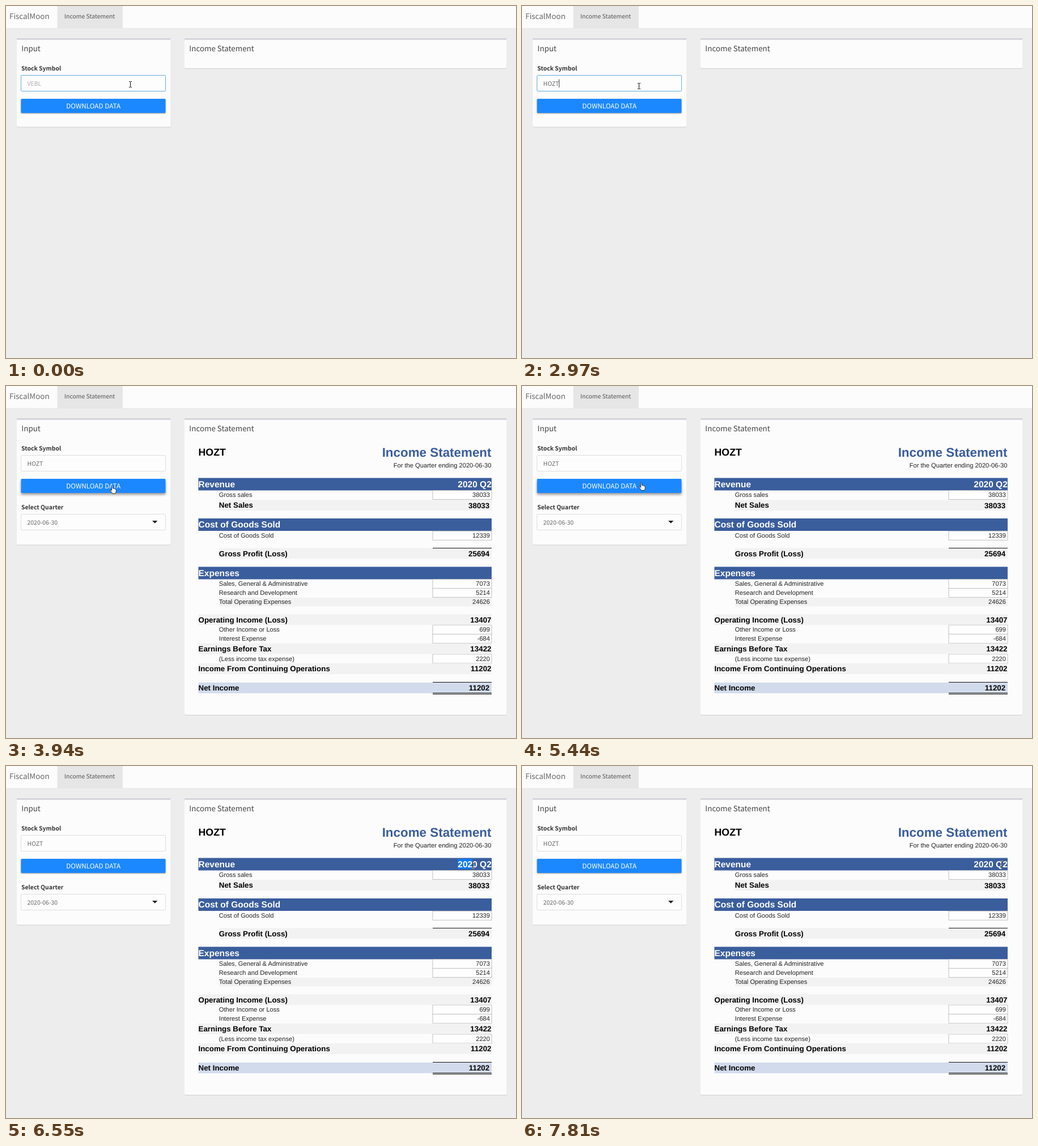
An HTML page for the animation above (8000 ms loop, 900 by 622 pixels).

```html
<!DOCTYPE html>
<html lang="en">
<head>
<meta charset="utf-8">
<title>Income statement</title>
<style>
html, body { margin: 0; width: 100%; height: 100%; overflow: hidden; background: #ededed; }
svg { display: block; }
text { white-space: pre; text-rendering: geometricPrecision; }
.ui { font-family: "Noto Sans CJK JP", "Noto Sans CJK SC", "Noto Sans CJK", "Open Sans", sans-serif; font-size: 10.45px; }
.big { font-size: 13.4px; }
.sheet { font-family: "Liberation Sans", Arial, sans-serif; font-size: 11.15px; fill: #222; }
.total { font-size: 13.36px; font-weight: bold; fill: #000; }
.band { font-size: 15.5px; font-weight: bold; fill: #fff; }
.bold { font-weight: bold; }
.card { filter: drop-shadow(0 1px .5px rgba(0, 0, 0, .12)); }
.beam { mix-blend-mode: difference; }
</style>
</head>
<body>
<svg id="stage" width="900" height="622" viewBox="0 0 900 622"></svg>
<script>
const LOOP = 8000;
const SYMBOL = "HOZT";
const BLUE = "#3a5d9c";
const stage = document.getElementById("stage");

function add(tag, attrs, parent = stage) {
  const node = document.createElementNS("http://www.w3.org/2000/svg", tag);
  for (const key in attrs) node.setAttribute(key, attrs[key]);
  parent.append(node);
  return node;
}
const group = (attrs = {}) => add("g", attrs);
const rect = (x, y, width, height, fill, parent, extra = {}) =>
  add("rect", { x, y, width, height, fill, ...extra }, parent);
function text(str, x, y, cls, parent, extra = {}) {
  const node = add("text", { x, y, class: cls, ...extra }, parent);
  node.textContent = str;
  return node;
}
const END = { "text-anchor": "end" };

// Navigation bar
rect(0, 0, 900, 39, "#fcfcfc");
rect(0, 39, 900, 1, "#e8e8e8");
rect(90.5, 0, 115.5, 39.5, "#e6e6e6");
text("FiscalMoon", 6, 23.3, "ui big", stage, { fill: "#666" });
text("Income Statement", 103, 22, "ui", stage, { fill: "#555" });

// Cards
function card(x, width, title) {
  const body = rect(x, 57, width, 50, "#fcfcfc", stage, { rx: 2, class: "card" });
  rect(x, 57, width, 2.7, "#d2d3da", stage, { rx: 1 });
  text(title, x + 8.3, 80, "ui big", stage, { fill: "#444" });
  return body;
}
const inputCard = card(19, 271.5, "Input");
const sheetCard = card(315, 568.5, "Income Statement");

// Input form
const label = (str, y, parent) => text(str, 27, y, "ui bold", parent, { fill: "#333" });
const field = (y, parent) =>
  rect(26.5, y, 255, 28, "#fdfdfd", parent, { stroke: "#ddd", rx: 1 });
label("Stock Symbol", 113.5);
const inputBox = field(122.5);
const inputText = text("", 37.6, 141, "ui");
const caret = rect(37, 129.5, 1, 14.5, "#444");
const button = rect(26.5, 164, 255, 25, "#1c88ff", stage, { rx: 1.5 });
text("DOWNLOAD DATA", 154.2, 181.2, "ui", stage,
  { fill: "#fff", "text-anchor": "middle", style: "font-size:11.75px;font-weight:500" });

const results = group();
label("Select Quarter", 218, results);
field(226.5, results);
text("2020-06-30", 37.5, 244.7, "ui", results, { fill: "#666" });
add("path", { d: "M258 238h9.4l-4.7 4.7z", fill: "#222" }, results);

// Statement
const LEFT = 339.5, RIGHT = 857, INDENT = 375.8, CELL = 752.5;
const fillRow = (x, y, height, color) => rect(x, y, RIGHT - x, height, color, results);
const rule = y => fillRow(CELL + .5, y, 1, "#111");
const sheetText = (str, x, y, cls, extra) =>
  text(str, x, y, "sheet " + cls, results, extra);

text(SYMBOL, 339.5, 122.8, "sheet bold", results, { style: "font-size:17.8px;fill:#000" });
sheetText("Income Statement", RIGHT - .5, 125.2, "bold", { ...END, style: `font-size:22.4px;fill:${BLUE}` });
sheetText("For the Quarter ending 2020-06-30", RIGHT - .5, 144.4, "", END);

for (const y of [162.5, 234, 319.5]) fillRow(LEFT, y, 22, BLUE);
const selection = rect(797, 164, 0, 18, "#1279f2", results);
sheetText("Revenue", LEFT, 178.7, "band");
sheetText("2020 Q2", RIGHT - .2, 178.7, "band", END);
sheetText("Cost of Goods Sold", LEFT, 250.2, "band");
sheetText("Expenses", LEFT, 335.7, "band");

const cells = [
  ["Gross sales", 38033, 184.5],
  ["Cost of Goods Sold", 12339, 256.3],
  ["Sales, General & Administrative", 7073, 341.5],
  ["Research and Development", 5214, 357.5],
  ["Other Income or Loss", 699, 422.5],
  ["Interest Expense", -684, 438.5],
  ["(Less income tax expense)", 2220, 474]
];
for (const [name, value, y] of cells) {
  rect(CELL + .5, y, RIGHT - CELL - .5, 16, "#fefefe", results, { stroke: "#bbb", "stroke-width": .9 });
  sheetText(name, INDENT, y + 11.7, "");
  sheetText(value, 854, y + 11.9, "", END);
}

const totals = [
  ["Net Sales", 38033, 201.3, INDENT, 853.2],
  ["Gross Profit (Loss)", 25694, 286.5, INDENT, 853.2],
  ["Operating Income (Loss)", 13407, 403.5, LEFT, 856.5],
  ["Earnings Before Tax", 13422, 454.8, LEFT, 856.5],
  ["Income From Continuing Operations", 11202, 490.2, LEFT, 856.5],
  ["Net Income", 11202, 524, LEFT, 853.2]
];
for (const [name, value, y, x, right] of totals) {
  fillRow(x, y, 18.8, name === "Net Income" ? "#d2dbec" : "#f2f2f2");
  sheetText(name, x, y + 14, "total");
  sheetText(value, right, y + 14.2, "total", END);
}
fillRow(INDENT, 374, 15.3, "#f2f2f2");
sheetText("Total Operating Expenses", INDENT, 385.2, "");
sheetText(24626, 854, 385.4, "", END);
[286, 523, 542, 544].forEach(rule);

// Pointers, each drawn around its own hot spot
const pointers = {
  beam: group({ class: "beam" }),
  hand: group(),
  arrow: group()
};
add("path", { d: "M-2.5-5H-.7L0-4.4L.7-5H2.5M0-4.4V4.4M-2.5 5H-.7L0 4.4L.7 5H2.5",
  fill: "none", stroke: "#f4f4f4", "stroke-width": 1 }, pointers.beam);
const outlined = { fill: "#fff", stroke: "#222", "stroke-width": .9, "stroke-linejoin": "round" };
add("path", { ...outlined,
  d: "M-2.4 2V-5.6Q-2.4-6.8-1.4-6.8T-.4-5.6V-2Q1.4-2.7 1.7-1.4Q3.2-2 3.6-.7Q5.3-1 5.3.8V3Q5.2 5 4 7H-1.4Q-2.6 4.8-4.7 2.2Q-5.6.8-4.6.3T-2.4 2z" }, pointers.hand);
add("path", { ...outlined, d: "M.5.5V10.5L2.7 8.5L4.3 12L6 11.2L4.4 7.8H7.4z" }, pointers.arrow);

// Timelines of held values: [start ms, value...]
const typed = [[0, 0], [530, 1], [1060, 2], [1610, 3], [2010, 4]];
const caretShown = [[0, 0], [250, 1], [1490, 0], [1610, 1], [2410, 0], [2970, 1], [3420, 0]];
const border = [[0, "#62acdd"], [3420, "#a2c6dd"], [3570, "#ddd"]];
const lift = [[0, 0], [3270, .5], [3420, 1], [6310, .5], [6430, 0]];
const selectedTo = [[0, 797], [6430, 806], [6550, 823], [6680, 836], [6800, 848.2], [7100, 857], [7810, 797]];
const pointerPath = [
  [0, "beam", 219.5, 138.5], [2820, "beam", 212.5, 137.5], [2970, "beam", 206.5, 141.5],
  [3120, "hand", 189, 183], [5440, "hand", 212, 177.5],
  [5590, "arrow", 669.5, 134], [5740, "beam", 713.5, 145.5], [5900, "beam", 800.5, 174.5],
  [6040, "beam", 808.5, 176.5], [6160, "beam", 805.5, 176.5], [6310, "beam", 797.5, 176.5],
  [6430, "beam", 807.5, 176.5], [6550, "beam", 824.5, 176.5], [6680, "beam", 839.5, 176.5],
  [6800, "beam", 852.5, 176.5], [7100, "arrow", 858, 171], [7230, "arrow", 859, 171.5],
  [7380, "arrow", 857.5, 171], [7530, "beam", 846.5, 172.5]
];
const hold = (list, t) => list.findLast(([start]) => start <= t).slice(1);
const show = (node, on) => node.setAttribute("visibility", on ? "visible" : "hidden");

function render(t) {
  const [count] = hold(typed, t);
  inputText.textContent = count ? SYMBOL.slice(0, count) : "VEBL";
  inputText.setAttribute("fill", count ? "#666" : "#aaa");
  caret.setAttribute("x", count ? Math.round(37.2 + inputText.getComputedTextLength()) : 37);
  show(caret, hold(caretShown, t)[0]);
  inputBox.setAttribute("stroke", hold(border, t)[0]);

  const [k] = hold(lift, t);
  button.style.filter = `drop-shadow(0 ${1 + 2 * k}px ${1 + k}px rgba(0,0,0,.4))`;

  const loaded = t >= 3940;
  show(results, loaded);
  inputCard.setAttribute("height", loaded ? 223.5 : 156.5);
  sheetCard.setAttribute("height", loaded ? 524 : 53);
  selection.setAttribute("width", hold(selectedTo, t)[0] - 797);

  const [kind, x, y] = hold(pointerPath, t);
  for (const name in pointers) show(pointers[name], name === kind);
  pointers[kind].setAttribute("transform", `translate(${x} ${y})`);
}

const began = performance.now();
function tick() {
  render((performance.now() - began) % LOOP);
  requestAnimationFrame(tick);
}
tick();
</script>
</body>
</html>
```
